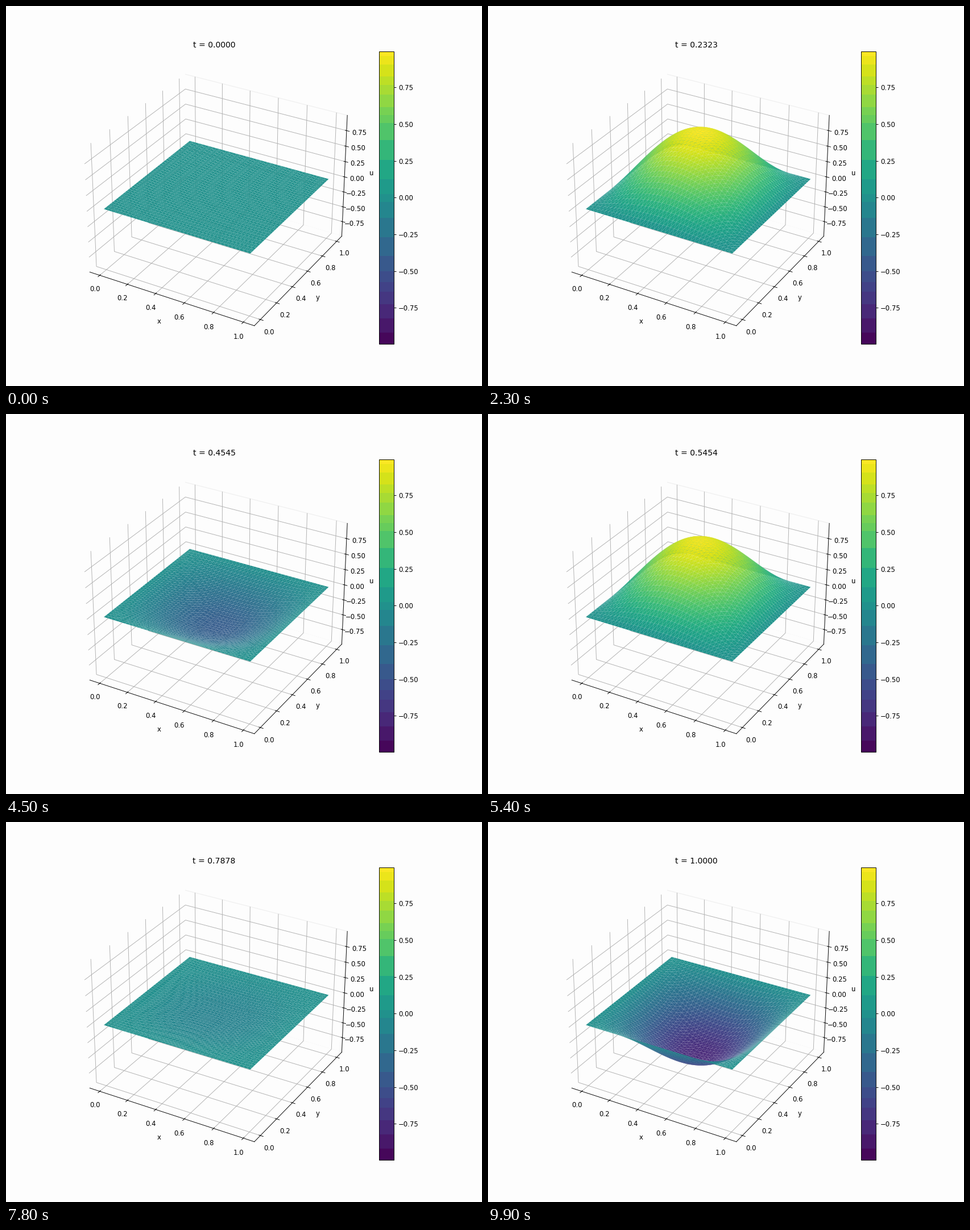
A matplotlib script that plays this animation: 837x669 px, repeating every 10000 ms.

```python
import numpy as np
import matplotlib.pyplot as plt
from matplotlib.animation import FuncAnimation
from matplotlib.cm import ScalarMappable
from matplotlib.collections import PolyCollection
from matplotlib.colors import ListedColormap, Normalize
from mpl_toolkits.mplot3d import proj3d

W, H, DPI = 837, 669, 83.7
FRAMES, INTERVAL = 100, 100
CELLS = 40
OMEGA, DAMPING = 19.77, 0.0195
U_MIN, U_MAX = -0.998, 0.993
PAPER = "#fdfdfd"


class Sheet(PolyCollection):
    """Flat polygons that are already projected and depth-sorted."""

    def do_3d_projection(self):
        return 0


def unit_mesh(n):
    """Right-diagonal triangulation of the unit square."""
    x, y = np.meshgrid(np.linspace(0, 1, n + 1), np.linspace(0, 1, n + 1))
    ids = np.arange((n + 1) ** 2).reshape(n + 1, n + 1)
    a, b = ids[:-1, :-1].ravel(), ids[:-1, 1:].ravel()
    c, d = ids[1:, :-1].ravel(), ids[1:, 1:].ravel()
    tris = np.vstack([np.column_stack([a, b, d]), np.column_stack([a, d, c])])
    return x.ravel(), y.ravel(), tris


def banded(cmap, edges):
    """Colormap made of flat steps between the given fractions."""
    edges = np.asarray(edges)
    mids = (edges[:-1] + edges[1:]) / 2
    pos = (np.arange(512) + 0.5) / 512
    band = np.clip(np.searchsorted(edges, pos) - 1, 0, len(mids) - 1)
    return ListedColormap(cmap(mids[band]))


plt.rcParams["font.family"] = "DejaVu Sans"
fig = plt.figure(figsize=((W + 1e-6) / DPI, (H + 1e-6) / DPI), dpi=DPI,
                 facecolor=PAPER)
ax = fig.add_subplot(111, projection="3d", facecolor=PAPER)
margin = 0.05 + 1.1 / 48
ax.set(xlim=(-margin, 1 + margin), ylim=(-margin, 1 + margin),
       zlim=(U_MIN, U_MAX), xlabel="x", ylabel="y", zlabel="u")
for axis, edge in ((ax.xaxis, PAPER), (ax.yaxis, "#efefef"), (ax.zaxis, PAPER)):
    axis.pane.set(facecolor=PAPER, edgecolor=edge, alpha=1)
title = ax.set_title("t = 0.0000")

viridis = plt.get_cmap("viridis")
norm = Normalize(U_MIN, U_MAX)
steps = np.array([0, 20, 45, 70, 93, 110, 129, 155, 188, 222, 250, 265, 291,
                  324, 359, 389, 403, 417, 440, 457, 472, 492, 507, 515]) / 515
fig.colorbar(ScalarMappable(norm, banded(viridis, steps)), ax=ax)

x, y, tris = unit_mesh(CELLS)
mode = np.sin(np.pi * x) * np.sin(np.pi * y)
proj = ax.get_proj()
sheet = Sheet([], edgecolors="none", antialiaseds=True)
ax.add_collection(sheet, autolim=False)


def update(i):
    t = (i * 10000 // (FRAMES - 1)) / 10000
    u = -np.exp(-DAMPING * t) * np.sin(OMEGA * t) * mode
    px, py, depth = (np.asarray(v) for v in proj3d.proj_transform(x, y, u, proj))
    order = np.argsort(-depth[tris].mean(axis=1), kind="stable")
    faces = tris[order]
    sheet.set_verts(np.stack([px[faces], py[faces]], axis=-1))
    sheet.set_facecolor(viridis(norm(u[faces].mean(axis=1))))
    title.set_text(f"t = {t:.4f}")
    return sheet, title


anim = FuncAnimation(fig, update, frames=FRAMES, interval=INTERVAL,
                     init_func=lambda: update(0), repeat=True, repeat_delay=0)
plt.show()
```
